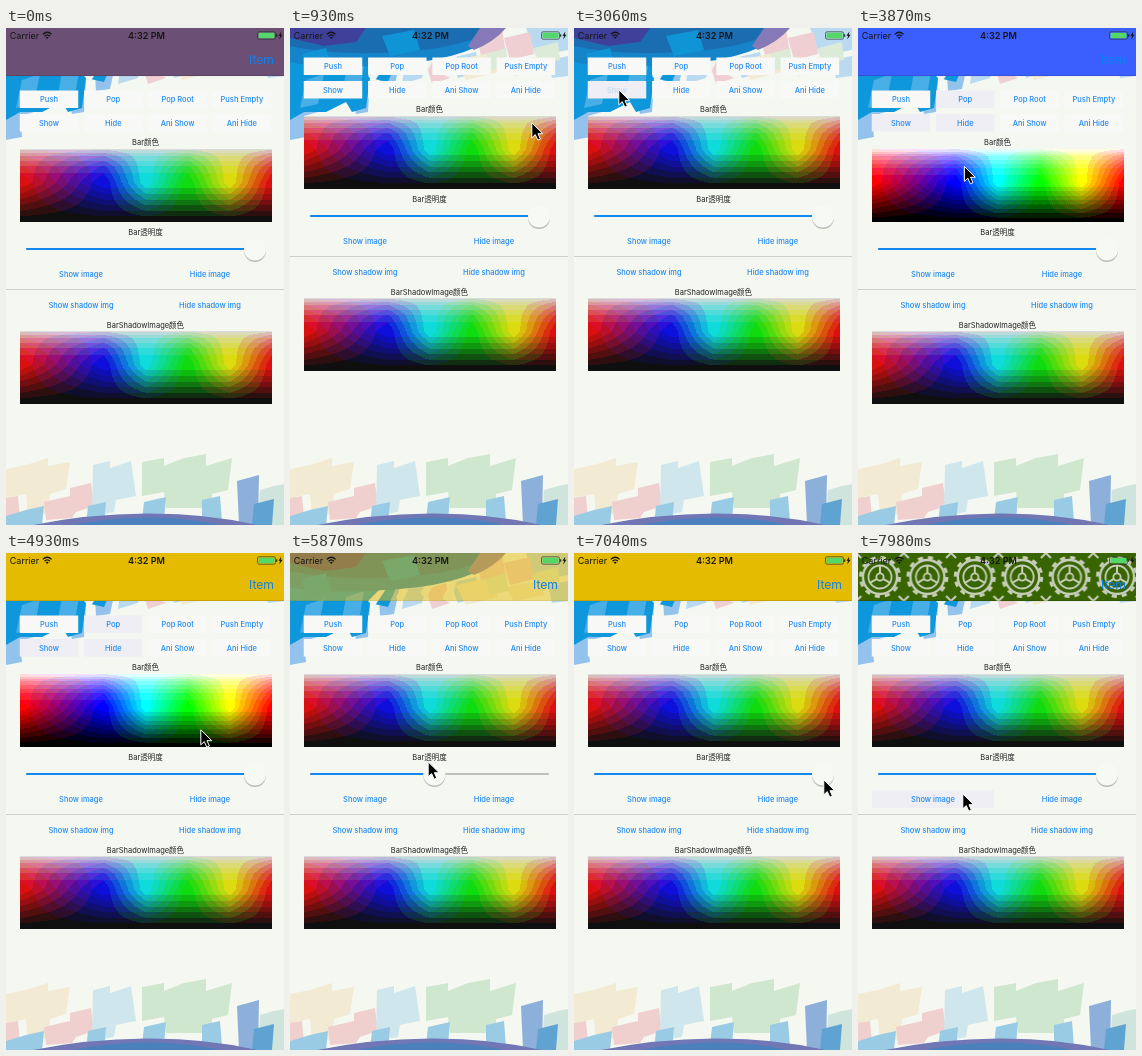
These frames come from a looping animation (278x497 px, 8000 ms). An HTML page:

```html
<!DOCTYPE html>
<html lang="en">
<head>
<meta charset="utf-8">
<title>Navigation bar demo</title>
<style>
html, body { margin: 0; width: 100%; height: 100%; overflow: hidden; background: #f5f8f1; }
svg { display: block; width: 278px; height: 497px; }
text { font-family: Inter, "Noto Sans CJK SC", "Noto Sans CJK", sans-serif; text-anchor: middle; }
.btn { font-size: 7.5px; fill: #2089f3; font-weight: 500; }
.label { font-size: 7.5px; fill: #222; }
</style>
</head>
<body>
<svg viewBox="0 0 278 497" xmlns="http://www.w3.org/2000/svg">
  <defs>
    <linearGradient id="hue">
      <stop offset="0" stop-color="#f00"/>
      <stop offset=".167" stop-color="#800080"/>
      <stop offset=".333" stop-color="#00f"/>
      <stop offset=".5" stop-color="#0ff"/>
      <stop offset=".667" stop-color="#0f0"/>
      <stop offset=".833" stop-color="#ff0"/>
      <stop offset="1" stop-color="#f00"/>
    </linearGradient>
    <linearGradient id="shade" x2="0" y2="1">
      <stop offset="0" stop-color="#fff" stop-opacity=".9"/>
      <stop offset=".1" stop-color="#fff" stop-opacity=".56"/>
      <stop offset=".25" stop-color="#fff" stop-opacity=".24"/>
      <stop offset=".46" stop-color="#fff" stop-opacity="0"/>
      <stop offset=".46" stop-color="#000" stop-opacity="0"/>
      <stop offset="1" stop-color="#000"/>
    </linearGradient>
    <filter id="dim" x="0" y="0" width="1" height="1" color-interpolation-filters="sRGB">
      <feComponentTransfer>
        <feFuncR type="discrete" tableValues=".06 .18 .32 .46 .6 .73 .86"/>
        <feFuncG type="discrete" tableValues=".06 .18 .32 .46 .6 .73 .86"/>
        <feFuncB type="discrete" tableValues=".06 .18 .32 .46 .6 .73 .86"/>
      </feComponentTransfer>
    </filter>
    <filter id="vivid" x="0" y="0" width="1" height="1" color-interpolation-filters="sRGB">
      <feComponentTransfer>
        <feFuncR type="discrete" tableValues="0 .12 .25 .37 .5 .62 .75 .87 1"/>
        <feFuncG type="discrete" tableValues="0 .12 .25 .37 .5 .62 .75 .87 1"/>
        <feFuncB type="discrete" tableValues="0 .12 .25 .37 .5 .62 .75 .87 1"/>
      </feComponentTransfer>
    </filter>
    <pattern id="gears" x="-1.7" y="0" width="47.4" height="48" patternUnits="userSpaceOnUse">
      <rect width="48" height="48" fill="#386500"/>
      <g fill="none" stroke="#c6cdb9" transform="translate(23.7 24)">
        <circle r="19.5" stroke-width="3" stroke-dasharray="5.1 5.11"/>
        <circle r="17" stroke-width="2.4"/>
        <circle r="11.5" stroke-width="1.8"/>
        <circle r="3.6" stroke-width="1.8"/>
        <path d="M0-11.5V-3.6M-10 5.8L-3.1 1.8M10 5.8L3.1 1.8" stroke-width="2"/>
        <path d="M-23.7-24l5 5M23.7-24l-5 5M-23.7 24l5-5M23.7 24l-5-5" stroke-width="2"/>
      </g>
    </pattern>
    <g id="picker">
      <rect width="252" height="73" fill="url(#hue)"/>
      <rect width="252" height="73" fill="url(#shade)"/>
    </g>
  </defs>

  <rect width="278" height="497" fill="#f5f8f1"/>

  <!-- wallpaper, upper part -->
  <g>
    <path fill="#93c3ec" d="M0 68L30 58 28 84 14 88 16 109 0 112zM60 60L80 52 78 84 66 86zM88 30L112 24 104 61 90 63z"/>
    <path fill="#0e97da" d="M0 0H150L128 32 108 30 98 54 80 50 76 80 62 84 56 74 36 84 14 84 0 92z"/>
    <path fill="#47aee6" d="M16 52L34 46 28 76 10 80zM56 44L74 38 70 62 52 66z"/>
    <path fill="#b9daf0" d="M116 28L140 22 132 50 112 56zM160 30L186 24 190 44 168 50zM236 0H278V22L246 28zM258 32L278 28V48L262 50z"/>
    <path fill="#f0cfd2" d="M186 6L212 0 216 26 192 32zM136 36L156 30 160 50 142 56zM214 10L240 4 244 26 220 32z"/>
    <path fill="#f3ead3" d="M166 32L204 24 208 44 176 52zM216 34L250 28 254 42 224 48z"/>
    <path fill="#dcebd8" d="M196 26L216 20 218 38 200 42zM244 20L268 14 270 32 248 36z"/>
    <path fill="#eff5f3" d="M106 44L118 26 122 28 112 50zM78 48L92 34 96 36 84 54zM130 40L142 22 146 26 136 46zM152 46L164 22 168 24 160 50z"/>
    <path fill="#1584c8" d="M0 0H214Q186 30 110 36T0 34z"/>
    <path fill="#1b6db2" d="M0 0H206Q176 20 110 24T0 18z"/>
    <path fill="#3f4099" d="M0 0H76L66 14 34 18 0 10z"/>
    <path fill="#8679b7" d="M190 0H216Q204 14 184 22L178 18z"/>
    <path fill="#0f95d6" d="M92 8L124 2 130 22 100 28zM12 26L36 20 42 40 16 46z"/>
  </g>

  <!-- wallpaper, lower part -->
  <g>
    <path fill="#f3ead3" d="M0 441L20 437 42 430V438L64 434 60 461 44 466 42 486 22 488 20 466 0 470z"/>
    <path fill="#f0d0ce" d="M64 460L85 455 88 478 70 484 66 490 40 492 38 474 64 468zM0 470L12 468 14 490 0 492z"/>
    <path fill="#cfe7ec" d="M87 437L104 433V440L125 433 130 468 110 472 108 484 86 488z"/>
    <path fill="#d0e7cf" d="M136 434L158 430V438L178 430 200 426V438L226 430 222 462 206 466V480H160L158 464 136 468z"/>
    <path fill="#9acbe5" d="M0 488L20 482 38 478 36 497H0zM82 478L100 474 98 497H80zM138 474L160 469 158 492H136zM196 472L214 468 216 494H196z"/>
    <path fill="#8cb0d9" d="M231 453L253 447 252 497H233z"/>
    <path fill="#cfe4dc" d="M254 462L268 458 278 456V497H252z"/>
    <path fill="#5fa3d2" d="M248 476L268 471 266 497H246z"/>
    <path fill="#7077b4" d="M18 499Q76 486 140 485.5T260 499z"/>
    <path fill="#4a80bb" d="M58 499Q96 490 140 489.5T222 499z"/>
  </g>

  <g id="page">
    <g id="buttons"></g>
    <text class="label" x="139.5" y="117">Bar颜色</text>
    <use id="pick" href="#picker" x="14" y="121" filter="url(#dim)"/>
    <text class="label" x="139.5" y="207">Bar透明度</text>
    <rect x="20" y="220" width="239" height="2" rx="1" fill="#bcbfba"/>
    <rect id="level" x="20" y="220" width="229" height="2" rx="1" fill="#1288f0"/>
    <g id="knob">
      <circle cy="223" r="11" fill="#b9bbb8"/>
      <circle cy="221.5" r="11" fill="#f7f9f5"/>
    </g>
    <rect y="261" width="278" height="1" fill="#cfd1cc"/>
    <text class="label" x="139.5" y="299.5">BarShadowImage颜色</text>
    <use href="#picker" x="14" y="303" filter="url(#dim)"/>
  </g>

  <g id="bar">
    <g id="fill">
      <rect id="tint" width="278" height="48"/>
      <rect y="47.5" width="278" height=".6" fill="#000" opacity=".25"/>
    </g>
    <text x="255.5" y="35.6" font-size="12.2" fill="#0d80f0">Item</text>
  </g>

  <g id="status" fill="#161616">
    <text x="18.5" y="10.6" font-size="9">Carrier</text>
    <g fill="none" stroke="#161616" stroke-width="1.3">
      <path d="M36.8 6.4Q41.2 2.2 45.6 6.4M38.5 8.2Q41.2 5.6 43.9 8.2"/>
    </g>
    <path d="M39.7 9.4Q41.2 8 42.7 9.4L41.2 11z"/>
    <text x="140.5" y="10.8" font-size="9.1" font-weight="600">4:32 PM</text>
    <rect x="251.5" y="3.8" width="18" height="7.4" rx="1.6" fill="none" stroke="#333" stroke-width=".7"/>
    <rect x="252.5" y="4.8" width="16" height="5.4" rx=".8" fill="#53d769"/>
    <path d="M270.2 6.2h1v2.6h-1zM275.4 3.6l-3 4.2h1.7l-.9 3.6 3.3-4.6h-1.8z"/>
  </g>

  <path id="cursor" d="M.8.8V15.8L4.3 12.6 6.8 18.2 9.4 17 7 11.7H11.8z" fill="#000" stroke="#fff" stroke-width="1"/>
</svg>

<script>
const LOOP = 8000, STEP = 117.27, START = 240;
const $ = id => document.getElementById(id);
const clamp = (v, a, b) => Math.max(a, Math.min(b, v));
const mix = (a, b, u) => a + (b - a) * u;
const ramp = (t, a, b) => { const u = clamp((t - a) / (b - a), 0, 1); return u * u * (3 - 2 * u); };
const within = (t, a, b) => t >= a && t < b;

const buttons = {};
function addButton(name, cx, cy, w) {
  const ns = "http://www.w3.org/2000/svg";
  const box = document.createElementNS(ns, "rect");
  const text = document.createElementNS(ns, "text");
  const set = (el, attrs) => { for (const k in attrs) el.setAttribute(k, attrs[k]); };
  set(box, { x: cx - w / 2, y: cy - 9, width: w, height: 17.5 });
  set(text, { x: cx, y: cy + 2.8, class: "btn" });
  text.textContent = name;
  $("buttons").append(box, text);
  buttons[name] = { box, text };
}
["Push", "Pop", "Pop Root", "Push Empty"].forEach((s, i) => addButton(s, 43 + 64.3 * i, 71.5, 58.5));
["Show", "Hide", "Ani Show", "Ani Hide"].forEach((s, i) => addButton(s, 43 + 64.3 * i, 95, 58.5));
["Show image", "Hide image"].forEach((s, i) => addButton(s, 75 + 129 * i, 246.5, 122));
["Show shadow img", "Hide shadow img"].forEach((s, i) => addButton(s, 75 + 129 * i, 277, 122));

// time, x, y of the pointer
const path = [
  [240, 264, 150], [640, 241, 94], [1000, 241, 94], [1560, 172, 61], [1850, 172, 61],
  [2300, 107, 95], [2640, 107, 95], [3000, 44, 61], [3460, 44, 61], [3640, 60, 132],
  [4230, 190, 148], [4600, 231, 156], [4720, 231, 156], [4930, 194, 176], [5050, 208, 178],
  [5290, 249, 216], [5400, 249, 216], [6340, 25, 200], [6470, 25, 200], [7000, 249, 226],
  [7430, 249, 226], [7850, 104, 240]
];
function pointer(t) {
  const i = path.findIndex(k => k[0] > t);
  if (i === 0) return path[0].slice(1);
  if (i < 0) return path[path.length - 1].slice(1);
  const [a, x, y] = path[i - 1], [b, X, Y] = path[i], u = ramp(t, a, b);
  return [mix(x, X, u), mix(y, Y, u)];
}

const stops = [[255, 0, 0], [128, 0, 128], [0, 0, 255], [0, 255, 255], [0, 255, 0], [255, 255, 0], [255, 0, 0]];
function colourAt([x, y]) {
  const h = clamp((x - 14) / 252, 0, .999) * 6, i = Math.floor(h);
  const v = clamp((y - 121) / 73, 0, 1), light = v < .46;
  const amount = light ? .9 * (1 - v / .46) ** 2 : (v - .46) / .54;
  const rgb = stops[i].map((c, n) =>
    Math.round(mix(mix(c, stops[i + 1][n], h - i), light ? 255 : 0, amount)));
  return `rgb(${rgb})`;
}

function shown(t) {
  if (t < 1500) return 1 - ramp(t, 690, 915);
  if (t < 2340) return ramp(t, 1620, 1850);
  return t < 3170 ? 0 : 1;
}

function draw(now) {
  const raw = now % LOOP;
  const t = raw < START ? 0 : START + STEP * Math.floor((raw - START + 15) / STEP);
  const p = shown(t), [x, y] = pointer(t);

  $("page").setAttribute("transform", `translate(0 ${-33 * (1 - p)})`);
  $("bar").setAttribute("transform", `translate(0 ${-48.5 * (1 - p)})`);

  const tint = t > 7950 ? "url(#gears)"
    : t < 3640 ? "#6b4f75"
    : t < 4650 ? colourAt([x, y]) : "#e4bb00";
  $("tint").setAttribute("fill", tint);

  const k = within(t, 5400, 7000) ? clamp(39 + (x - 25) * 210 / 224, 39, 249) : 249;
  $("knob").setAttribute("transform", `translate(${k} 0)`);
  $("level").setAttribute("width", k - 20);
  $("fill").setAttribute("opacity", (k - 39) / 210);

  $("pick").setAttribute("filter", within(t, 3640, 5060) ? "url(#vivid)" : "url(#dim)");

  const pressed = {
    "Ani Hide": within(t, 590, 700),
    "Ani Show": within(t, 1520, 1640),
    "Hide": within(t, 2230, 2345),
    "Show": within(t, 3020, 3160)
  };
  const tinted = {
    "Pop": within(t, 3160, 5100),
    "Show": within(t, 3020, 5100),
    "Hide": within(t, 3160, 5100),
    "Show image": t > 7840
  };
  for (const name in buttons) {
    const b = buttons[name];
    b.text.setAttribute("opacity", pressed[name] ? .2 : 1);
    b.box.setAttribute("fill", tinted[name] ? "#eeeef4" : "#f8f9f6");
    b.box.setAttribute("opacity", b.box.y.baseVal.value > 200 && !tinted[name] ? 0 : 1);
  }

  $("cursor").setAttribute("transform", `translate(${x} ${y})`);
  $("cursor").setAttribute("opacity", t < START ? 0 : 1);
}

const begin = performance.now();
function tick() {
  draw(performance.now() - begin);
  requestAnimationFrame(tick);
}
tick();
</script>
</body>
</html>
```
